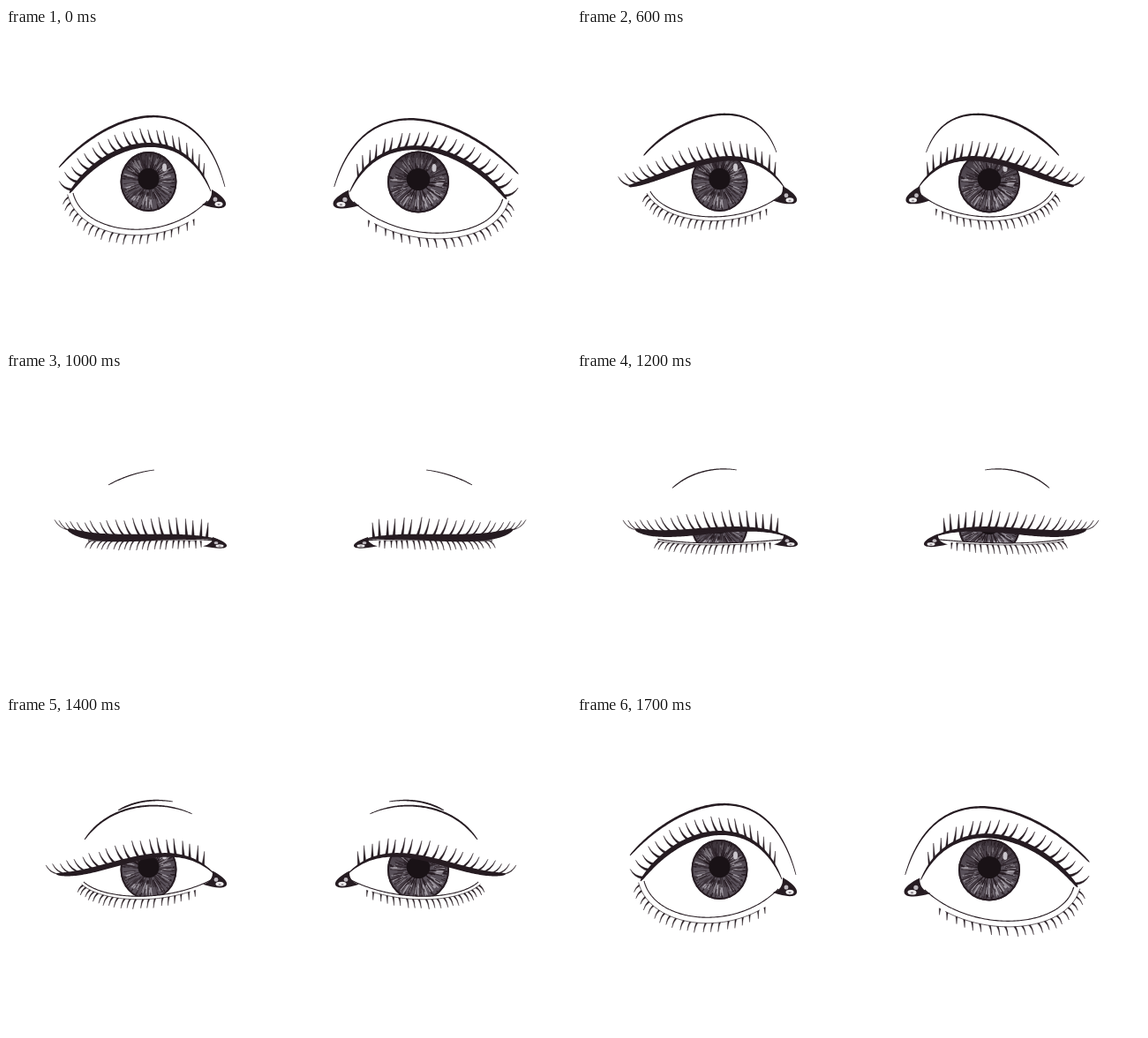
Animation of 640x358 px, one loop 2.2 s. Source, as an HTML page with a canvas:

```html
<!DOCTYPE html>
<html lang="en">
<head>
<meta charset="utf-8">
<title>Blinking eyes</title>
<style>
  html, body { margin: 0; width: 100%; height: 100%; overflow: hidden; background: #fff; }
  canvas { display: block; }
</style>
</head>
<body>
<canvas id="stage" width="640" height="358"></canvas>
<script>
const ctx = document.getElementById('stage').getContext('2d');
const INK = '#261c22';

// Key poses of the left eye. Each curve is one cubic Bezier, outer to inner side.
// axis, stretch and tilt place the mirrored right eye.
const wide = {
  lid: [72,187, 115,125, 200,105, 232,185], low: [76,187, 88,235, 180,245, 228,196],
  brow: [60,158, 110,100, 215,55, 248,180],
  lidWidth: 5, browWidth: 2, gap: 6.5, lash: 21, tip: [248,198], depth: 1,
  axis: 647, stretch: 1.11, tilt: .04
};
const open = {
  lid: [60,180, 115,150, 195,100, 234,183], low: [78,182, 92,228, 185,242, 230,193],
  brow: [62,149, 105,105, 225,40, 241,171],
  lidWidth: 6.5, browWidth: 2.4, gap: 5.5, lash: 22, tip: [247,198], depth: 1,
  axis: 620, stretch: 1, tilt: 0
};
const half = {
  lid: [57,179, 110,184, 185,128, 236,179], low: [88,188, 110,208, 180,212, 232,186],
  brow: [89,140, 118,98, 175,94, 211,111], fold: [127,107, 148,95, 170,94, 189,97],
  lidWidth: 5.5, browWidth: 1.4, gap: 3.5, lash: 22, tip: [249,189], depth: .9,
  axis: 623, stretch: 1, tilt: 0
};
const shut = {
  lid: [70,178, 105,198, 190,180, 240,190], low: [93,190, 140,191, 190,187, 238,191],
  brow: [116,128, 134,118, 152,113, 168,111],
  lidWidth: 8, browWidth: .5, gap: 1.5, lash: 25, tip: [249,196], depth: .6,
  axis: 644, stretch: 1, tilt: 0
};

function mix(a, b, t) {
  if (typeof a === 'number') return a + (b - a) * t;
  if (Array.isArray(a)) return a.map((v, i) => mix(v, b[i], t));
  const shared = Object.keys(a).filter(k => k in b);
  return Object.fromEntries(shared.map(k => [k, mix(a[k], b[k], t)]));
}
const poses = [wide, open, mix(open, half, .5), half,
               { ...mix(half, shut, .4), axis: 630 },
               { ...mix(half, shut, .7), axis: 643 }, shut];

// Points along a Bezier with unit tangent; the normal (-ty, tx) points down.
function curve([x0, y0, x1, y1, x2, y2, x3, y3], steps = 100) {
  const at = (a, b, c, d, u) =>
    a * (1 - u) ** 3 + 3 * b * u * (1 - u) ** 2 + 3 * c * u * u * (1 - u) + d * u ** 3;
  const slope = (a, b, c, d, u) =>
    (b - a) * (1 - u) ** 2 + 2 * (c - b) * u * (1 - u) + (d - c) * u * u;
  return Array.from({ length: steps + 1 }, (_, i) => {
    const u = i / steps;
    const dx = slope(x0, x1, x2, x3, u), dy = slope(y0, y1, y2, y3, u);
    const len = Math.hypot(dx, dy);
    return { u, x: at(x0, x1, x2, x3, u), y: at(y0, y1, y2, y3, u), tx: dx / len, ty: dy / len };
  });
}
const shift = (p, d) => ({ ...p, x: p.x - p.ty * d, y: p.y + p.tx * d });
const sample = (points, u) => points[Math.round(u * (points.length - 1))];

function trace(points) {
  ctx.beginPath();
  points.forEach(p => ctx.lineTo(p.x, p.y));
}
function line(points, width) {
  trace(points);
  ctx.lineWidth = width;
  ctx.stroke();
}
function brush(points, width) {
  const reach = p => .35 + width / 2 * Math.max(0, Math.sin(Math.PI * p.u ** .6)) ** .7;
  trace([...points.map(p => shift(p, -reach(p))),
         ...points.map(p => shift(p, reach(p))).reverse()]);
  ctx.fill();
}

function lash(p, length, width, cx, cy, x, y) {
  const bx = p.tx * width / 2, by = p.ty * width / 2;
  const mx = p.x + cx * length, my = p.y + cy * length;
  ctx.beginPath();
  ctx.moveTo(p.x - bx, p.y - by);
  ctx.quadraticCurveTo(mx - bx / 2, my - by / 2, p.x + x * length, p.y + y * length);
  ctx.quadraticCurveTo(mx + bx / 2, my + by / 2, p.x + bx, p.y + by);
  ctx.fill();
  ctx.lineWidth = .4;
  ctx.stroke();
}
function lashes(lid, base, length) {
  const count = 21;
  for (let i = 0; i < count; i++) {
    const f = i / (count - 1), lean = 1 - 1.1 * f;
    const vary = .72 + .26 * Math.sin(Math.PI * f) + .06 * Math.sin(i * 2.4);
    lash(sample(lid, .02 + .9 * f), length * vary, 3,
         -.65 * lean, -.5 + .42 * lean, -.95 * lean, -1 + .35 * lean);
    lash(sample(base, .02 + .86 * f), 12 * vary, 1.8,
         -.5 * lean, .3, -.7 * lean, .9);
  }
}

function ellipse(x, y, rx, ry, color) {
  ctx.beginPath();
  ctx.ellipse(x, y, rx, ry, 0, 0, 7);
  ctx.fillStyle = color;
  ctx.fill();
}
function iris(x, y, rx, ry, seed) {
  const random = () => (seed = seed * 16807 % 2147483647) / 2147483647;
  const rays = (count, color, width, from, to, spread) => {
    ctx.strokeStyle = color;
    for (let i = 0; i < count; i++) {
      const angle = random() * 2 * Math.PI;
      const c = Math.cos(angle) * rx, s = Math.sin(angle) * ry;
      const inner = from + random() * spread, outer = to - random() * spread;
      ctx.lineWidth = width * (.6 + random() * .7);
      ctx.beginPath();
      ctx.moveTo(x + c * inner, y + s * inner);
      ctx.lineTo(x + c * outer, y + s * outer);
      ctx.stroke();
    }
  };
  ellipse(x, y, rx, ry, '#59515a');
  rays(75, '#a39da5', 1.2, .42, .92, .2);
  rays(90, '#342a31', .9, .35, 1, .35);
  rays(70, INK, 1, .78, 1, .12);
  rays(50, INK, 1, .2, .66, .2);
  const shade = ctx.createLinearGradient(0, y - ry, 0, y);
  shade.addColorStop(0, 'rgba(38,28,34,.6)');
  shade.addColorStop(1, 'rgba(38,28,34,0)');
  ellipse(x, y, rx, ry, shade);
  ellipse(x, y - 3, rx * .38, ry * .36, '#191216');
  ctx.strokeStyle = INK;
  ctx.lineWidth = 2;
  ctx.beginPath();
  ctx.ellipse(x, y, rx - 1, ry - 1, 0, 0, 7);
  ctx.stroke();
  ellipse(x + 18, y - 16, 2.5, 4.5, '#c9c5cb');
}

function corner([x, y], depth) {
  ctx.save();
  ctx.translate(x, y);
  ctx.scale(1, depth);
  ctx.beginPath();
  ctx.moveTo(-15, -15);
  ctx.bezierCurveTo(-6, -10, 2, -3, 1, 2);
  ctx.bezierCurveTo(0, 8, -12, 7, -26, 2);
  ctx.quadraticCurveTo(-14, -2, -15, -15);
  ctx.fill();
  ellipse(-11, -4, 2.4, 2.6, '#bdb8be');
  ellipse(-7, 1.5, 4.5, 2.8, '#efedef');
  ellipse(-7, 2, 1.5, 1, '#8a8389');
  ctx.restore();
}

function eye(pose, place, irisShape) {
  const lid = curve(pose.lid), low = curve(pose.low);
  const base = low.map(p => shift(p, pose.gap));
  ctx.save();
  ctx.setTransform(...place);
  trace([...lid, ...low.slice().reverse()]);
  ctx.clip();
  ctx.resetTransform();
  iris(...irisShape);
  ctx.restore();

  ctx.save();
  ctx.setTransform(...place);
  ctx.fillStyle = ctx.strokeStyle = INK;
  line(low, 1.1);
  line(base.slice(0, 86), .7);
  brush(lid, pose.lidWidth);
  lashes(lid, base, pose.lash);
  brush(curve(pose.brow), pose.browWidth);
  if (pose.fold) brush(curve(pose.fold), 1.2);
  corner(pose.tip, pose.depth);
  ctx.restore();
}

function draw(pose) {
  const { axis, stretch, tilt } = pose;
  ctx.fillStyle = '#fff';
  ctx.fillRect(0, 0, 640, 358);
  eye(pose, [1, 0, 0, 1, 0, 0], [161.5, 174, 32, 34, 71]);
  eye(pose, [-stretch, -tilt, 0, 1, axis, tilt * 248], [467, 174.5, 35, 35, 1234]);
}

let shown = -1;
function tick() {
  const step = Math.floor(performance.now() % 2200 / 100);
  const index = Math.max(0, Math.min(6, step - 4, 17 - step));
  if (index !== shown) draw(poses[shown = index]);
  requestAnimationFrame(tick);
}
tick();
</script>
</body>
</html>
```
